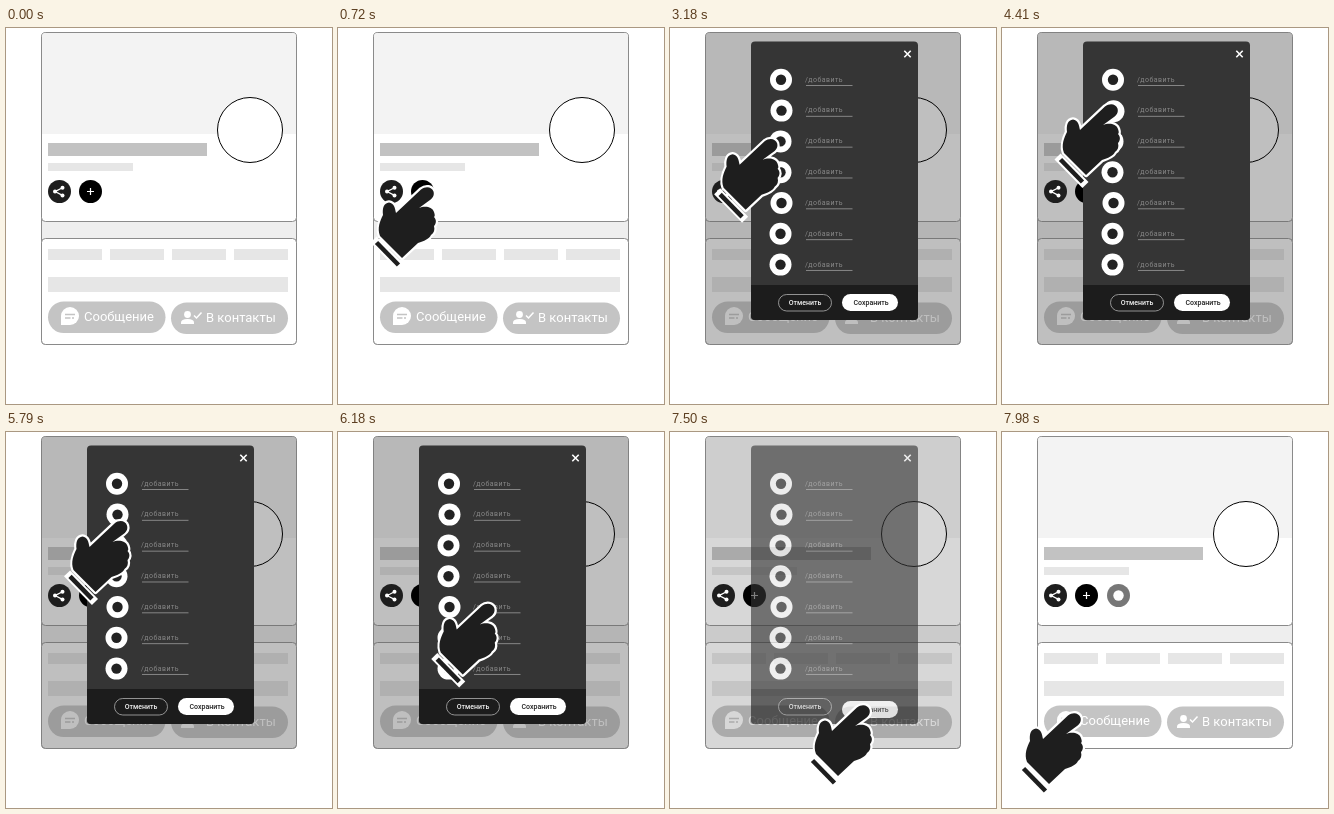
Write an HTML page that moves like this. It is 326x376 px and loops after 8000 ms.

```html
<!DOCTYPE html>
<html lang="ru">
<head>
<meta charset="utf-8">
<style>
html, body { margin: 0; width: 100%; height: 100%; overflow: hidden; background: #fff; }
svg { display: block; width: 326px; height: 376px; }
text { font-family: Roboto, "Open Sans", sans-serif; }
</style>
</head>
<body>
<svg id="stage" viewBox="0 0 326 376" xmlns="http://www.w3.org/2000/svg"></svg>
<script>
const LOOP = 8000;
const stage = document.getElementById('stage');

const rect = (x, y, w, h, fill, r = 0, extra = '') =>
  `<rect x="${x}" y="${y}" width="${w}" height="${h}" rx="${r}" fill="${fill}" ${extra}/>`;
const disc = (x, y, r, fill, extra = '') =>
  `<circle cx="${x}" cy="${y}" r="${r}" fill="${fill}" ${extra}/>`;
const line = (d, color, w, extra = '') =>
  `<path d="${d}" fill="none" stroke="${color}" stroke-width="${w}" ${extra}/>`;
const label = (x, y, size, fill, s, extra = '') =>
  `<text x="${x}" y="${y}" font-size="${size}" fill="${fill}" ${extra}>${s}</text>`;
const group = (id, body) => `<g id="${id}">${body}</g>`;

const edge = 'stroke="#8a8a8a"';
const pale = '#e6e6e6', mid = '#c4c4c4';

function profile() {
  const tabs = [42, 104, 166, 228].map(x => rect(x, 221, 54, 11, pale)).join('');
  return rect(35.5, 4.5, 255, 312, '#eee', 4, edge)
    + rect(35.5, 4.5, 255, 189, '#fff', 4, edge)
    + '<path d="M36 106V8q0-3 3-3H287q3 0 3 3V106z" fill="#f3f3f3"/>'
    + rect(35.5, 210.5, 255, 106, '#fff', 4, edge)
    + disc(244, 102, 32.5, '#fff')
    + rect(42, 115, 159, 13, '#c2c2c2') + rect(42, 135, 85, 8, pale)
    + tabs + rect(42, 249, 240, 15, pale)
    + rect(42, 273.5, 117.5, 31.5, mid, 15.75)
    + rect(165, 274.5, 117, 31.5, mid, 15.75)
    + '<path d="M55 297V288a9 9 0 1 1 9 9z" fill="#fff"/>'
    + line('M59 286.5H69M59 290H64.500M66 290H68', mid, 1.4)
    + label(78, 293, 13, '#fff', 'Сообщение')
    + disc(181.5, 286.5, 3.4, '#fff')
    + '<path d="M175 296v-1.500q0-3.500 6.500-3.500t6.500 3.500V296z" fill="#fff"/>'
    + line('M188 287.500l2.500 2.500 5-5.500', '#fff', 1.5)
    + label(200, 294, 13, '#fff', 'В контакты');
}

function roundButtons() {
  const share = disc(53.5, 163.5, 11.5, '#1e1e1e')
    + line('M56.500 159.800L49 163.600L56.500 167.400', '#fff', 1.2)
    + [[49, 163.6], [56.5, 159.8], [56.5, 167.4]].map(p => disc(...p, 2, '#fff')).join('');
  const plus = disc(84.5, 163.5, 11.5, '#000')
    + line('M81 163.500h7M84.500 160v7', '#fff', 1.2);
  const added = disc(116.5, 163.5, 11.5, '#000') + disc(116.5, 163.5, 5.2, '#fff');
  return share + group('plus', plus) + group('added', added);
}

function dialog() {
  const shift = [0.5, 1, 0, 0, 1, 0, 0];
  const rows = shift.map((dx, i) => {
    const y = 51.8 + i * 30.8;
    const icon = disc(110.5 + dx, y, 11, '#fff') + disc(110.5 + dx, y, 5.2, '#222');
    return group('row' + i, icon)
      + label(135, 53.5 + i * 30.85, 7, '#888', '/добавить', 'letter-spacing=".45"')
      + line(`M136 ${57.5 + i * 30.83}h46.500`, '#858585', 1);
  }).join('');
  const save = rect(172, 266, 56, 17, '#fff', 8.5);
  return rect(81, 13.5, 167, 278.5, '#353535', 4)
    + '<path d="M81 257H248V288q0 4-4 4H85q-4 0-4-4z" fill="#1c1c1c"/>'
    + line('M234.300 22.800l6.400 6.400m0-6.400l-6.400 6.400', '#fff', 1.6)
    + rows
    + rect(108.5, 266.5, 53, 16.5, 'none', 8.25, 'stroke="#a0a0a0" stroke-width=".9"')
    + label(135, 277, 7, '#f2f2f2', 'Отменить', 'text-anchor="middle" font-weight="500"')
    + group('save', group('saveFill', save)
      + label(201, 276.5, 7, '#222', 'Сохранить', 'text-anchor="middle" font-weight="500"'));
}

// Drawn with the fingertip at 0,0
function pointer() {
  const body = 'M-5-5.500C0-9.500 6-8 7.500-3.500C8.500 0 7 3 4 5L-7 13'
    + 'C-2 11 6 11 8 17C9 20 9 21 8 22C11 25 10 29 8 31C9 35 8 38 5 40'
    + 'C3 44-2 46-8 48L-24 63L-46 41C-49 33-46 26-43 20C-44 13-42 8-37 7.500'
    + 'C-32 8-31 13-30 18Z';
  const cuff = 'M-49.500 47.500L-27.500 70';
  const round = 'stroke-linejoin="round"';
  return line(body, '#fff', 4.5, round)
    + line(cuff, '#fff', 8.5, 'stroke-linecap="square"')
    + line(cuff, '#1e1e1e', 4.6)
    + `<path d="${body}" fill="#1e1e1e"/>`;
}

stage.innerHTML = profile()
  + group('shade', rect(35.5, 4.5, 255, 312, '#5f5f5f', 4))
  + disc(244, 102, 32.5, 'none', 'stroke="#000"')
  + roundButtons()
  + group('dialog', dialog())
  + group('hand', pointer());

const part = {};
stage.querySelectorAll('g[id]').forEach(g => part[g.id] = g);

const ramp = (t, a, b) => Math.min(1, Math.max(0, (t - a) / (b - a)));
const steps = (t, keys) => keys.reduce((v, [at, to]) => t >= at ? to : v, 0);
const move = (g, x, y) => g.setAttribute('transform', `translate(${x} ${y})`);
const fade = (g, v) => {
  g.setAttribute('opacity', v);
  g.setAttribute('display', v > 0 ? 'inline' : 'none');
};

// start, end, x, y of each straight move
const moves = [
  [330, 720, 88, 167],
  [2850, 3420, 108, 84],
  [5730, 6660, 192, 281],
  [7590, 7980, 71, 289]
];

function draw(t) {
  let x = -12, y = 269;
  for (const [a, b, tx, ty] of moves) {
    const k = ramp(t, a, b);
    x += (tx - x) * k;
    y += (ty - y) * k;
  }
  move(part.hand, x, y);
  fade(part.hand, t >= 345 ? 1 : 0);

  const shown = ramp(t, 1020, 1840) * (1 - ramp(t, 7320, 7800));
  fade(part.dialog, shown);
  fade(part.shade, 0.4 * shown);
  fade(part.saveFill, 0.55 + 0.45 * ramp(t, 1830, 2300));
  fade(part.added, 0.53 * ramp(t, 7600, 7980));

  move(part.plus, 0, steps(t, [[1050, 0.7], [1290, 1.4], [1500, 0.7], [1710, 0]]));
  move(part.row1, 0, steps(t, [[4410, 0.7], [4650, 1.5], [4860, 0.7], [5100, 0]]));
  move(part.save, 0, steps(t, [[6780, 1], [6990, 2], [7170, 3]]));
}

const tick = () => {
  draw(performance.now() % LOOP);
  requestAnimationFrame(tick);
};
tick();
</script>
</body>
</html>
```
